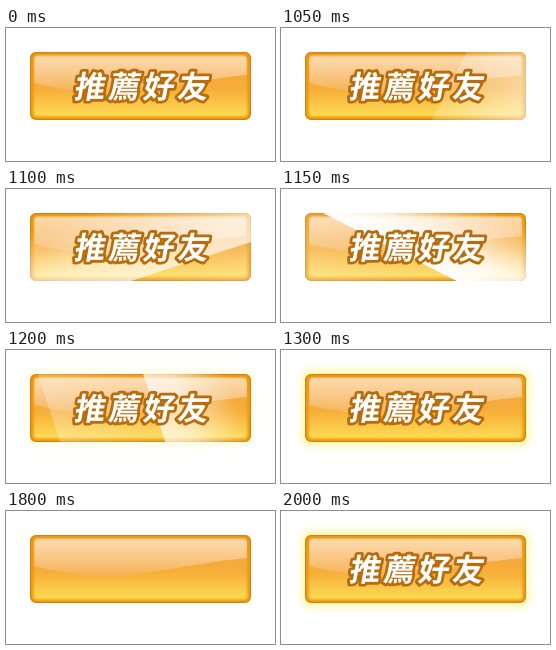
Write an HTML page that moves like this. It is 269 px wide and 133 px high and loops after 3500 ms.

```html
<!DOCTYPE html>
<html lang="zh-Hant">
<head>
<meta charset="utf-8">
<title>Button</title>
<style>
html, body { margin: 0; width: 100%; height: 100%; overflow: hidden; background: #fff; }
svg { display: block; width: 269px; height: 133px; }
text {
  font: 700 31px "Noto Sans CJK TC", "Noto Sans CJK", sans-serif;
  letter-spacing: 3.4px;
  fill: #fff;
  stroke: #b96c0c;
  stroke-width: 5.6px;
  stroke-linejoin: round;
  paint-order: stroke;
}
</style>
</head>
<body>
<svg viewBox="0 0 269 133">
  <defs>
    <linearGradient id="body" x2="0" y2="1">
      <stop offset="0" stop-color="#f2a440"/>
      <stop offset=".55" stop-color="#f6ae3a"/>
      <stop offset="1" stop-color="#ffe258"/>
    </linearGradient>
    <linearGradient id="gloss" x2="0" y2="1">
      <stop offset="0" stop-color="#fcdcb0"/>
      <stop offset=".5" stop-color="#f9c888"/>
      <stop offset="1" stop-color="#f5b455"/>
    </linearGradient>
    <linearGradient id="faint">
      <stop offset="0" stop-color="#fff" stop-opacity=".2"/>
      <stop offset="1" stop-color="#fff" stop-opacity=".65"/>
    </linearGradient>
    <linearGradient id="bright">
      <stop offset="0" stop-color="#fff" stop-opacity="0"/>
      <stop offset=".65" stop-color="#fff" stop-opacity=".85"/>
      <stop offset="1" stop-color="#fff"/>
    </linearGradient>
    <clipPath id="outline"><rect x="24" y="24" width="221" height="68" rx="6"/></clipPath>
    <filter id="blur" x="-10%" y="-30%" width="120%" height="160%"><feGaussianBlur stdDeviation="3"/></filter>
    <filter id="soft"><feGaussianBlur stdDeviation="1"/></filter>
  </defs>

  <rect id="glow" x="20" y="19" width="229" height="78" rx="9" fill="#fff8b8" filter="url(#blur)"/>
  <g clip-path="url(#outline)">
    <rect x="24" y="24" width="221" height="68" fill="url(#body)"/>
    <path d="M28 32Q28 27 33 27H236Q241 27 241 32V47C208 50 186 55 158 59C112 67 72 66 28 55Z" fill="url(#gloss)"/>
    <rect x="25" y="25" width="219" height="66" rx="6" fill="none" stroke="#ec960c" stroke-width="5" filter="url(#soft)"/>
    <rect x="24.5" y="24.5" width="220" height="67" rx="6" fill="none" stroke="#cf8210"/>
    <!-- both sheets meet along one edge, which turns about the pivot -->
    <g id="sheen">
      <rect id="ahead" y="-200" width="100" height="400" fill="url(#faint)"/>
      <rect id="behind" x="-80" y="-200" width="80" height="400" fill="url(#bright)"/>
    </g>
  </g>
  <text id="label" transform="translate(67.3 70) skewX(-10)">推薦好友</text>
</svg>
<script>
const LOOP = 3500, SWEEP = 1050, SHINE = 1300, BLINK = 1800, BACK = 2000;
const STEP = 50, COUNT = (SHINE - SWEEP) / STEP;
const [glow, sheen, ahead, behind, label] =
  ["glow", "sheen", "ahead", "behind", "label"].map(id => document.getElementById(id));
const start = performance.now();

const fade = (part, value) => part.setAttribute("opacity", value);

function draw(now) {
  const t = Math.max(0, now - start) % LOOP;
  const sweeping = t >= SWEEP && t < SHINE;
  const blank = t >= BLINK && t < BACK;
  const k = Math.max(0, Math.min(COUNT, Math.floor((t - SWEEP) / STEP)));

  fade(label, blank ? 0 : 1);
  fade(glow, blank ? 0 : Math.max(0, (k - 2) / (COUNT - 2)));
  fade(sheen, sweeping ? 1 : 0);
  fade(ahead, 1 - k / COUNT);
  fade(behind, Math.max(0, Math.sin(Math.PI * k / 4)));
  sheen.setAttribute("transform", `translate(156 82) rotate(${27 + 45 * k})`);
  requestAnimationFrame(draw);
}
draw(start);
</script>
</body>
</html>
```
